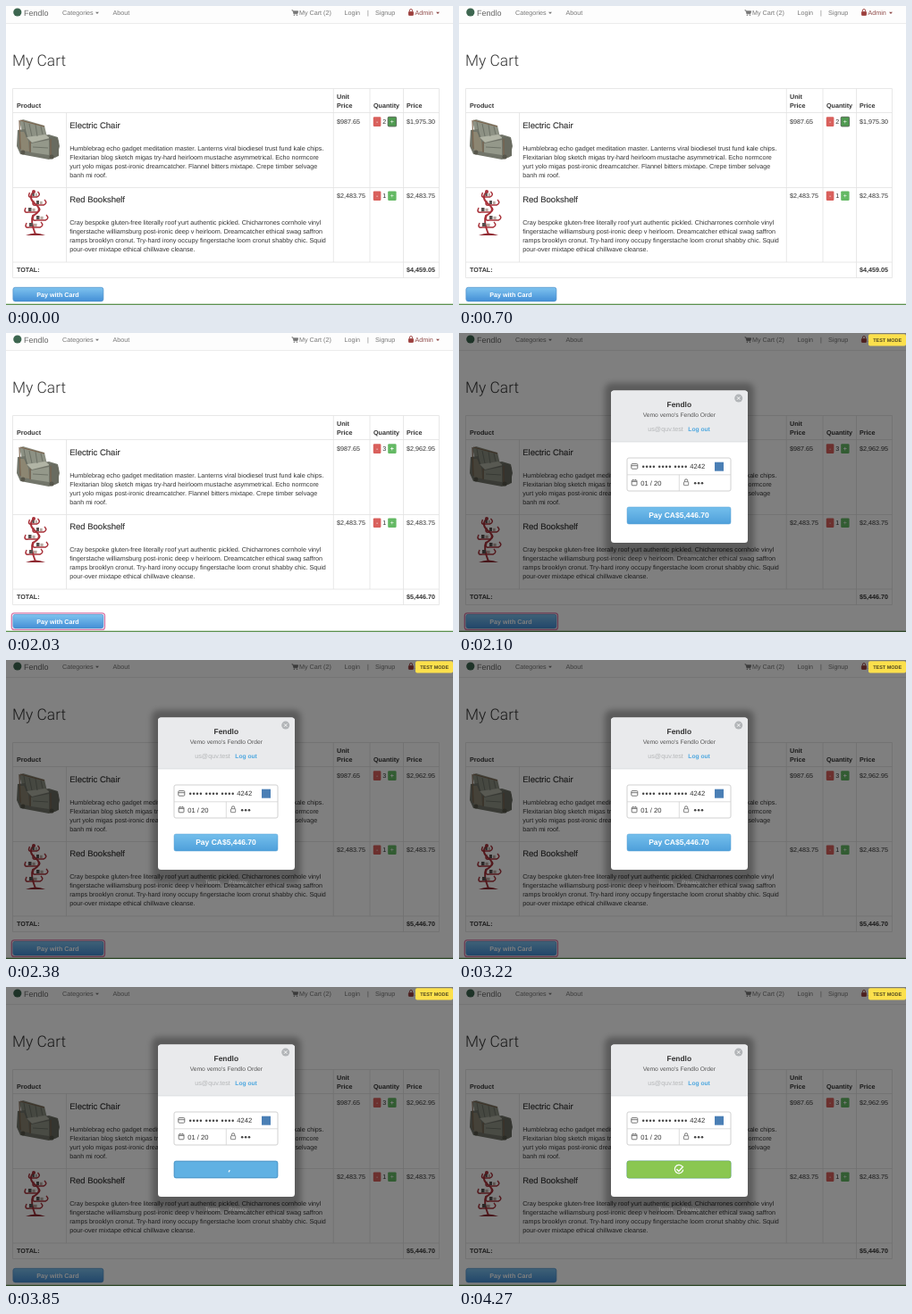
An HTML page that plays this animation: 500x335 px, repeating every 4340 ms.

```html
<!DOCTYPE html>
<html lang="en">
<head>
<meta charset="utf-8">
<title>Cart checkout</title>
<style>
  html, body { margin: 0; width: 100%; height: 100%; overflow: hidden; background: #fff; }
  svg { display: block; width: 500px; height: 335px; }
  text {
    font: 7.18px "Liberation Sans", Arial, sans-serif;
    fill: #333;
    text-rendering: geometricPrecision;
    white-space: pre;
  }
  .b { font-weight: bold; }
  .nav { fill: #777; }
  .brand { font-size: 9px; fill: #666; }
  .h1 { font: 300 17.4px Roboto, "Open Sans", sans-serif; }
  .h4 { font-size: 9.5px; stroke: #333; stroke-width: .15; }
  .mid { text-anchor: middle; }
  .white { fill: #fff; }
  .grid { fill: none; stroke: #e2e2e2; stroke-width: .8; }
  .icon { fill: none; stroke: #666; stroke-width: .9; }
</style>
</head>
<body>
<svg id="stage" viewBox="0 0 500 335"></svg>
<script>
const LOOP = 4340;
const T = { added: 750, focus: 1800, open: 2075, pay: 3360, spin: 3500, done: 4180 };

const text = (x, y, s, cls = "", extra = "") =>
  `<text x="${x}" y="${y}" class="${cls}" ${extra}>${s}</text>`;
const rect = (x, y, w, h, fill, r = 0, extra = "") =>
  `<rect x="${x}" y="${y}" width="${w}" height="${h}" rx="${r}" fill="${fill}" ${extra}/>`;
const path = (d, extra) => `<path d="${d}" ${extra}/>`;
const dot = (x, y, r, fill) => `<circle cx="${x}" cy="${y}" r="${r}" fill="${fill}"/>`;
const group = (id, body, extra = "") => `<g id="${id}" ${extra}>${body}</g>`;
const lines = (x, y, list) => list.map((s, i) => text(x, y + i * 10, s)).join("");
const bullets = (x, y, n, r = 1.25) =>
  Array.from({ length: n }, (_, i) => dot(x + i * 3.9, y, r, "#444")).join("");
const caret = (x, y, fill) => path(`M${x} ${y}h4l-2 2.1z`, `fill="${fill}"`);

const padlock = (x, y, color, solid) =>
  path(`M${x + 1} ${y + 3}v-1.3a1.6 1.6 0 0 1 3.2 0v1.3`, `fill="none" stroke="${color}" stroke-width=".9"`) +
  rect(x, y + 3, 5.2, 4, solid ? color : "none", .6, `stroke="${color}" stroke-width=".8"`);

function navBar() {
  return rect(0, 0, 500, 20, "#fdfdfd") + rect(0, 19.3, 500, .8, "#e5e5e5") +
    dot(12.8, 7, 4.6, "#3d6650") +
    text(20, 10.8, "Fendlo", "brand") +
    text(63, 10.2, "Categories", "nav") + caret(100, 6.8, "#777") +
    text(119.5, 10.2, "About", "nav") +
    path("M319.5 4.8h1.4l1 4h4l.8-3h-5.6", 'fill="#777" stroke="#777" stroke-width=".8"') +
    dot(322.3, 10.2, .7, "#777") + dot(325.5, 10.2, .7, "#777") +
    text(328, 10.2, "My Cart (2)", "nav") +
    text(378.5, 10.2, "Login", "nav") + text(404, 10.2, "|", "nav") +
    text(413, 10.2, "Signup", "nav") +
    padlock(450.4, 3.4, "#9c3f3d", true) +
    text(457.5, 10.2, "Admin", "", 'style="fill:#8f4a48"') + caret(481, 6.8, "#8f4a48");
}

function sofa() {
  return path("M15 129l4-2 24 7 3 13-26 3z", 'fill="#8d9184"') +
    path("M13 139l8-1 4 10 23-4 10 3 2 10-3 12-9 3-32-6-4-9z", 'fill="#72756a"') +
    path("M23 147l21-3 5 4-20 5z", 'fill="#b1b4a5"') +
    path("M15 141l5 0 5 10 1 12-9-1z", 'fill="#8c8672"') +
    path("M28 154l20-4v17l-20-3z", 'fill="#94988a"') +
    path("M48 147q9-2 11 5v16l-8 3z", 'fill="#696b60"') +
    path("M20 130l3 17m3-15l3 14m4-13l2 13m4-11l2 9M30 158l17 1", 'fill="none" stroke="#5f645a" stroke-width=".7"') +
    path("M15 128l1 32M16 128l27 7M27 152v12M50 149v21", 'fill="none" stroke="#7b624b" stroke-width="1.1"') +
    dot(19, 164, 2.4, "#57564b") + dot(51, 169, 2.6, "#57564b");
}

function bookshelf() {
  const tiers = [[31, 213, 4.5], [37, 222, 6], [29, 230, 7], [38, 239, 7], [31, 247, 8]];
  const shelf = ([x, y, w]) =>
    path(`M${x - w} ${y - 4}q-3 6 3 5h${w * 2 - 4}q5-2 1-6`, 'fill="none" stroke="#a8323a" stroke-width="1.5"') +
    rect(x - w + 3, y - 4, w * .5, 4, "#58504e") +
    rect(x - w + 4 + w * .5, y - 3.2, w * .45, 3.2, "#b9aaa2");
  return path("M31 208q-7 7 2 14t-3 13q-3 6 3 21", 'fill="none" stroke="#a8323a" stroke-width="2"') +
    tiers.map(shelf).join("") +
    path("M22 257q11-5 22 0z", 'fill="#8f2a32"') + dot(31, 208, 2, "#a8323a");
}

function qty(y) {
  return rect(410.8, y, 8.6, 10.6, "#d9605c", 1.2) + text(415.1, y + 7.6, "-", "white mid") +
    rect(427.2, y, 9.4, 10.6, "#64b964", 1.2) + text(431.9, y + 7.6, "+", "white mid");
}

function table() {
  return path("M7.5 92.5H484.5V304.5H7.5zM7.5 119.5H484.5M7.5 203.5H484.5M7.5 287H484.5" +
      "M67.5 119.5V287M366.3 92.5V287M407 92.5V287M444.5 92.5V304.5", 'class="grid"') +
    text(12, 113.6, "Product", "b") + text(370, 103.6, "Unit", "b") + text(370, 113.6, "Price", "b") +
    text(411, 113.6, "Quantity", "b") + text(448, 113.6, "Price", "b") +
    sofa() + bookshelf() +
    text(71.2, 137.2, "Electric Chair", "h4") +
    lines(71.2, 161.6, [
      "Humblebrag echo gadget meditation master. Lanterns viral biodiesel trust fund kale chips.",
      "Flexitarian blog sketch migas try-hard heirloom mustache asymmetrical. Echo normcore",
      "yurt yolo migas post-ironic dreamcatcher. Flannel bitters mixtape. Crepe timber selvage",
      "banh mi roof."]) +
    text(71.2, 220.4, "Red Bookshelf", "h4") +
    lines(71.2, 244.8, [
      "Cray bespoke gluten-free literally roof yurt authentic pickled. Chicharrones cornhole vinyl",
      "fingerstache williamsburg post-ironic deep v heirloom. Dreamcatcher ethical swag saffron",
      "ramps brooklyn cronut. Try-hard irony occupy fingerstache loom cronut shabby chic. Squid",
      "pour-over mixtape ethical chillwave cleanse."]) +
    text(370, 131.6, "$987.65") + text(370, 214.8, "$2,483.75") +
    qty(124.3) + qty(207.4) +
    rect(427.2, 124.3, 9.4, 10.6, "#4f9a50", 1.2, 'id="ring" stroke="#5d6b5d" stroke-width="1"') +
    text(431.9, 131.9, "+", "white mid") +
    text(421.2, 131.6, "", "", 'id="count"') + text(421.2, 214.8, "1") +
    text(448, 131.6, "", "", 'id="sub"') + text(448, 214.8, "$2,483.75") +
    text(12, 298.2, "TOTAL:", "b") + text(448, 298.2, "", "b", 'id="total"');
}

function page() {
  return rect(0, 0, 500, 335, "#fff") + navBar() +
    text(7, 67.4, "My Cart", "h1") + table() +
    rect(7.9, 315.3, 101, 15.6, "url(#sky)", 2.4, 'stroke="#4a8fcb" stroke-width=".7"') +
    text(58, 325.8, "Pay with Card", "b white mid") +
    rect(6.3, 313.8, 104.2, 18.6, "none", 3, 'id="focus" stroke="#d777a8" stroke-width="1.3"') +
    rect(0, 333.7, 500, 1.3, "#5d9150");
}

function form() {
  return rect(188, 140, 116, 37, "#fff", 2, 'stroke="#ccc" stroke-width=".9"') +
    path("M188 158.8h116M246.3 158.8V177", 'stroke="#d4d4d4" stroke-width=".8"') +
    rect(192.8, 146.6, 7, 5.6, "none", 1, 'class="icon" style="fill:none"') +
    path("M192.8 148.7h7", 'class="icon"') +
    bullets(206.2, 149.8, 4) + bullets(224.2, 149.8, 4) + bullets(242, 149.8, 4) +
    text(258.3, 152.4, "4242", "", 'style="font-size:7.6px"') +
    rect(286, 144.7, 10, 10, "#4a7fb5") +
    rect(193.2, 165, 5.8, 5.8, "none", .8, 'class="icon" style="fill:none"') +
    path("M193.2 166.4h5.8M194.7 163.9v1M197.5 163.9v1", 'class="icon"') +
    text(203.3, 170.6, "01 / 20", "", 'style="font-size:7.6px"') +
    padlock(251.5, 163.7, "#666", false) + bullets(264.2, 168.2, 3);
}

function payButton() {
  return rect(188, 195, 116, 19, "url(#pay)", 2, 'stroke="#559fd3" stroke-width=".5"') +
    group("wait", rect(188.3, 195.3, 115.4, 18.4, "#60b1e3", 2, 'stroke="#4c94c4" stroke-width=".8"')) +
    text(246, 207.4, "Pay CA$5,446.70", "b white mid", 'id="amount" style="font-size:8.5px"') +
    group("spinner", path("M4.2 -.7A4.3 4.3 0 0 1 4.2 .9",
      'fill="none" stroke="#fff" stroke-width="1.2" stroke-linecap="round"')) +
    group("done", rect(188, 195, 116, 19, "#8ac751", 2, 'stroke="#79b244" stroke-width=".6"') +
      path("M249.6 201A4.7 4.7 0 1 0 250.7 204.6", 'fill="none" stroke="#fff" stroke-width="1.2"') +
      path("M243.4 203.9l2.4 2.5 5-5.5", 'fill="none" stroke="#fff" stroke-width="1.5"'));
}

function modal() {
  return rect(0, 0, 500, 335, "#000", 0, 'opacity=".5"') +
    rect(163, 56, 167, 194, "#000", 8, 'opacity=".28" filter="url(#soft)"') +
    group("terms", text(222.6, 251.2, "Terms", "", 'style="font-size:6.3px;fill:#fff"') +
      text(249.3, 251.2, "Privacy", "", 'style="font-size:6.3px;fill:#fff"')) +
    rect(170, 64.5, 153, 170.5, "#fff", 3.5) +
    path("M170 122V68a3.5 3.5 0 0 1 3.5-3.5H319.5A3.5 3.5 0 0 1 323 68V122z", 'fill="#e9eaec"') +
    rect(170, 121.6, 153, .7, "#d4d6d9") +
    dot(312.7, 73.1, 4.5, "#b2b5b8") +
    path("M311 71.4l3.4 3.4m0-3.4l-3.4 3.4", 'stroke="#f4f4f4" stroke-width="1"') +
    text(246.3, 82.9, "Fendlo", "b mid", 'style="font-size:8.4px"') +
    text(246.3, 93.9, "Vemo vemo's Fendlo Order", "mid", 'style="font-size:6.7px;fill:#555"') +
    text(211.3, 109.6, "us@quv.test", "", 'style="fill:#b4b6b8"') +
    text(256.3, 109.6, "Log out", "b", 'style="font-size:6.7px;fill:#4ba6df"') +
    form() + payButton() +
    rect(458, 1.2, 42, 13.2, "#fce04c", 2) +
    text(479.2, 9.8, "TEST MODE", "b mid", 'style="font-size:5.5px;fill:#4d4520"');
}

const fade = (id, top, bottom) =>
  `<linearGradient id="${id}" x2="0" y2="1"><stop stop-color="${top}"/><stop offset="1" stop-color="${bottom}"/></linearGradient>`;

document.getElementById("stage").innerHTML =
  `<defs>${fade("sky", "#7fc3ef", "#438fd6")}${fade("pay", "#74bfec", "#4e9fda")}
   <filter id="soft"><feGaussianBlur stdDeviation="3"/></filter></defs>` +
  page() + group("modal", modal());

const el = id => document.getElementById(id);
const show = (id, on) => el(id).setAttribute("opacity", Number(on));
const ramp = (t, from, span) => Math.min(1, Math.max(0, (t - from) / span));
const money = n => "$" + n.toLocaleString("en-US", { minimumFractionDigits: 2, maximumFractionDigits: 2 });

function draw(t) {
  const count = t < T.added ? 2 : 3;
  const sub = 987.65 * count;
  el("count").textContent = count;
  el("sub").textContent = money(sub);
  el("total").textContent = money(sub + 2483.75);

  show("ring", t < T.added);
  show("focus", t >= T.focus && t < T.pay);
  show("modal", t >= T.open);
  show("terms", .12 + .26 * ramp(t, T.open + 40, 140));
  show("wait", ramp(t, T.pay, 100));
  show("amount", 1 - ramp(t, T.pay, 140));
  show("spinner", ramp(t, T.spin, 100));
  const angle = 27 + (t - 3850) * 360 / 700;
  el("spinner").setAttribute("transform", `translate(246 204.2) rotate(${angle})`);
  show("done", t >= T.done);
}

function tick() {
  draw(performance.now() % LOOP);
  requestAnimationFrame(tick);
}
tick();
</script>
</body>
</html>
```
